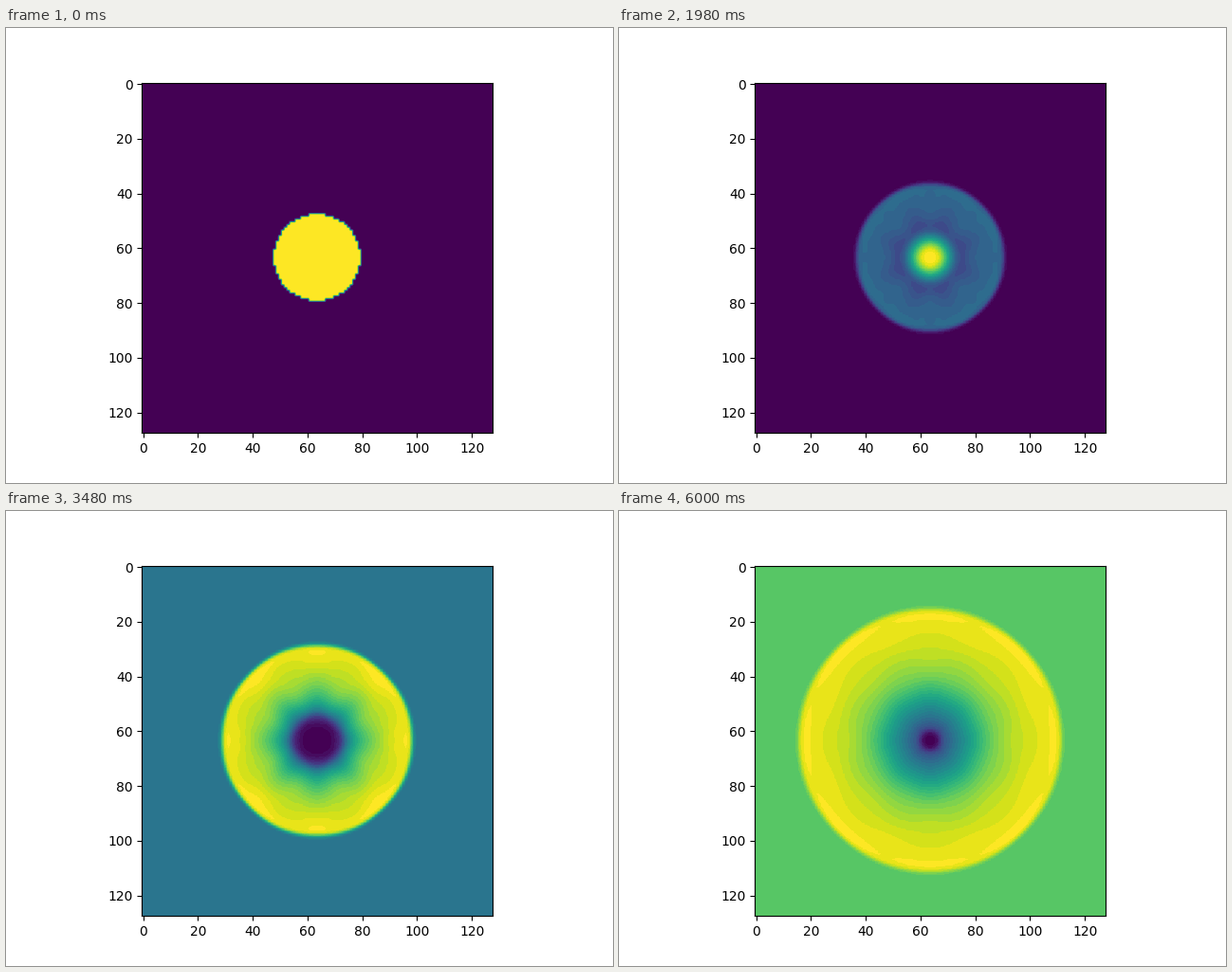
A matplotlib script that plays this animation: 640x480 px, repeating every 6060 ms.

```python
import matplotlib.pyplot as plt
import numpy as np
from matplotlib.animation import FuncAnimation
from matplotlib.colors import ListedColormap

# Radial dam break: 2D shallow water, Roe solver with MC-limited corrections
N = 128
FRAMES = 101
INTERVAL = 60
DT = 0.01
DX = 5 / N
RADIUS = 15.8  # in cells
LEVELS = 31


def shift(a, k):
    return np.roll(a, k, axis=1)


def roe_waves(h, hu, hv):
    """Waves and speeds at the low-side edge of every cell along axis 0."""
    left = [np.roll(q, 1, axis=0) for q in (h, hu, hv)]
    rl, rr = np.sqrt(left[0]), np.sqrt(h)
    u = (left[1] / rl + hu / rr) / (rl + rr)
    v = (left[2] / rl + hv / rr) / (rl + rr)
    c = np.sqrt((left[0] + h) / 2)
    dh, dhu, dhv = h - left[0], hu - left[1], hv - left[2]
    a1 = ((u + c) * dh - dhu) / (2 * c)
    a2 = dhv - v * dh
    a3 = (dhu - (u - c) * dh) / (2 * c)
    zero = np.zeros_like(h)
    waves = [
        np.stack([a1, a1 * (u - c), a1 * v]),
        np.stack([zero, zero, a2]),
        np.stack([a3, a3 * (u + c), a3 * v]),
    ]
    return waves, [u - c, u, u + c]


def limited(wave, s):
    norm = (wave ** 2).sum(axis=0)
    prev = (shift(wave, 1) * wave).sum(axis=0)
    after = (shift(wave, -1) * wave).sum(axis=0)
    upwind = np.where(s > 0, prev, after)
    ok = norm > 1e-24
    theta = np.where(ok, upwind / np.where(ok, norm, 1), 0)
    mc = np.minimum(np.minimum((1 + theta) / 2, 2), 2 * theta)
    return np.maximum(mc, 0) * wave


def sweep(q):
    """Advance one time step along axis 0 of the grid."""
    ratio = DT / DX
    waves, speeds = roe_waves(*q)
    right = np.zeros_like(q)
    left = np.zeros_like(q)
    flux = np.zeros_like(q)
    for wave, s in zip(waves, speeds):
        right += np.maximum(s, 0) * wave
        left += np.minimum(s, 0) * wave
        flux += 0.5 * np.abs(s) * (1 - np.abs(s) * ratio) * limited(wave, s)
    return q - ratio * (right + shift(left, -1) + shift(flux, -1) - flux)


def swap(q):
    return q[[0, 2, 1]].transpose(0, 2, 1)


def simulate():
    x = np.arange(N) - (N - 1) / 2
    q = np.zeros((3, N, N))
    q[0] = np.where(np.hypot(x[:, None], x) <= RADIUS, 2.0, 1.0)
    heights = [q[0]]
    for _ in range(FRAMES - 1):
        q = swap(sweep(swap(sweep(q))))
        heights.append(q[0])
    return heights


def stepped_viridis():
    # half-width first and last bands, so steps are centred on k / LEVELS
    k = (np.arange(2 * LEVELS) + 1) // 2
    return ListedColormap(plt.get_cmap("viridis")(k / LEVELS))


heights = simulate()

fig, ax = plt.subplots(figsize=(6.4, 4.8), dpi=100)
image = ax.imshow(heights[0], cmap=stepped_viridis())


def update(i):
    h = heights[i]
    image.set_data(h)
    image.set_clim(h.min(), h.max())
    return [image]


anim = FuncAnimation(fig, update, frames=FRAMES, interval=INTERVAL,
                     repeat=True, repeat_delay=0)
plt.show()
```
